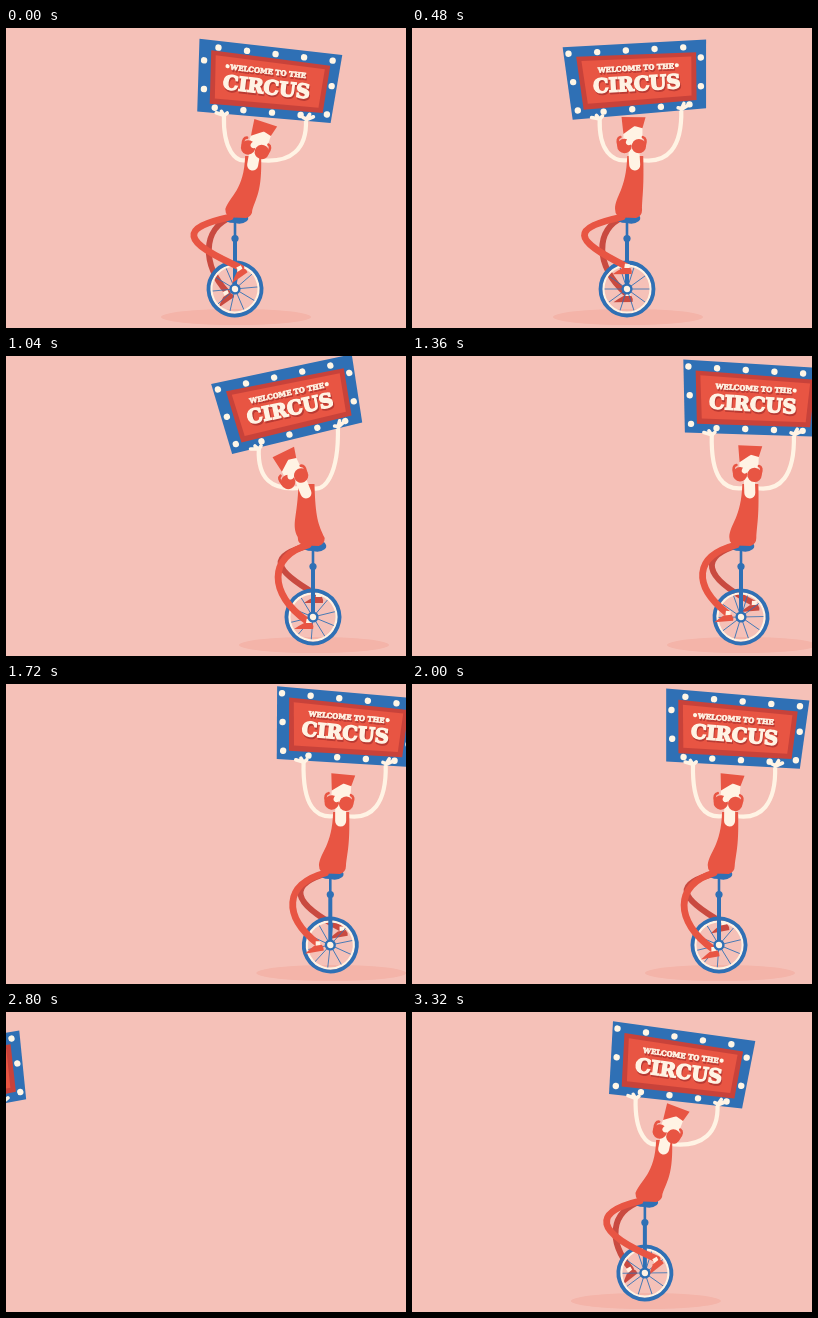
Recreate the animation shown at these times as an HTML page. Size 400 by 300 pixels, loop 3.36 s.

```html
<!DOCTYPE html>
<html lang="en">
<head>
<meta charset="utf-8">
<title>Unicyclist</title>
<style>
  html, body { margin: 0; width: 100%; height: 100%; overflow: hidden; background: #f5c1b8; }
  svg { display: block; width: 100vw; height: 100vh; }
  text { font-family: "DejaVu Serif", "Noto Serif", serif; font-weight: 700; text-anchor: middle; }
  .line { fill: none; stroke-linecap: round; stroke-linejoin: round; }
</style>
</head>
<body>
<svg viewBox="0 0 400 300">
  <defs>
    <g id="lettering">
      <text y="-8.500" font-size="7" stroke-width=".7">WELCOME TO THE</text>
      <text y="11.500" font-size="19.500" stroke-width="1.5">CIRCUS</text>
    </g>
    <g id="shoe">
      <path d="M1-7L0-1" stroke="#fff3e4" stroke-width="5" fill="none"/>
      <path d="M-14 3Q-8-1-4-3L4-3Q6 0 5 3Z"/>
    </g>
  </defs>
  <rect width="400" height="300" fill="#f5c1b8"/>
  <g id="rider">
    <ellipse cx="1" cy="289" rx="75" ry="8" fill="#f4b4a9"/>
    <path id="backLeg" class="line" stroke="#c94a40" stroke-width="6"/>
    <use id="backShoe" href="#shoe" fill="#c94a40"/>
    <g id="wheel" class="line">
      <g id="spokes" stroke="#2f70b5" stroke-width=".8"></g>
      <circle r="23.6" stroke="#fff3e4" stroke-width="2.2"/>
      <circle r="26.5" stroke="#2f70b5" stroke-width="3.8"/>
    </g>
    <g class="line" stroke="#2f70b5">
      <path d="M0 258V212" stroke-width="4"/>
      <path d="M0 212V192" stroke-width="2.6"/>
    </g>
    <circle cy="210.5" r="3.6" fill="#2f70b5"/>
    <path d="M-12 189Q0 191 11 186Q15 190 12 193Q7 197 0 195Q-11 195-12 189Z" fill="#2f70b5"/>
    <path id="frontLeg" class="line" stroke="#e85543" stroke-width="6.800"/>
    <use id="frontShoe" href="#shoe" fill="#e85543"/>
    <circle cy="261" r="4.4" fill="#fff3e4" stroke="#2f70b5" stroke-width="2.400"/>
    <path id="arms" class="line" stroke="#fff3e4" stroke-width="4.2"/>
    <path id="torso" fill="#e85543"/>
    <path id="neck" class="line" stroke="#fff3e4" stroke-width="11"/>
    <g id="head">
      <path d="M-8-6L11-12L11 8L-8 10Z" fill="#fff3e4"/>
      <path d="M-10-19L14-19L11-8L3-10L-8-2Z" fill="#e85543"/>
      <g fill="#e85543">
        <circle cx="-7" cy="10" r="7.2"/>
        <circle cx="7.500" cy="10" r="7.2"/>
      </g>
      <path class="line" d="M-13 9Q-15 2-11 1M13.500 9Q15.500 2 11.500 1" stroke="#e85543" stroke-width="2.600"/>
      <path d="M-2-5C-2 2-7 5-5 8Q-2 11 1 7L4-3Z" fill="#fff3e4"/>
    </g>
    <g id="sign">
      <path d="M-72-35.700L71.700-35.600L67.800 33.200L-66 37Z" fill="#2f70b5"/>
      <path d="M-59-25.500L61-23.500L58.800 24.300L-54.500 27.700Z" fill="#c8423a"/>
      <path d="M-54-21L56-19.500L54 19.500L-50 22Z" fill="#e85543"/>
      <use href="#lettering" x="1" y="1.800" fill="#b93a33" stroke="#b93a33"/>
      <use href="#lettering" fill="#fff3e4" stroke="#fff3e4"/>
      <path id="lampTrack" d="M-66.500-29L66-29L63 28L-60 31.500Z" fill="none"/>
      <g id="lamps" fill="#fff6e6"></g>
      <g class="line" stroke="#fff3e4" stroke-width="3.6">
        <path d="M-39 38L-42 34M-40 37.500L-47 36M-39 38L-36 35"/>
        <path d="M43 33L46 27M43 33L50 29M43 32L40 31"/>
      </g>
    </g>
  </g>
</svg>
<script>
const LOOP = 3360, STEP = 40, TRAVEL = -640, WHEEL_Y = 261, LAMPS = 26;
const el = id => document.getElementById(id);
const set = (id, name, value) => el(id).setAttribute(name, value);
const radians = degrees => degrees * Math.PI / 180;

// Key poses: time, wheel x, sign offset from the wheel, sign y, sign angle
const keys = [
  [0, 229, 32, 54.3, 6.5],
  [480, 215, 9.5, 51, -3.2],
  [680, 229, -11, 50, -9.5],
  [1040, 307, -24, 48, -12],
  [1360, 329, 12, 43.5, 3.5],
  [2000, 307, 16, 46, 4.7],
  [2240, 246, 30, 52, 7.5],
  [2800, -100, 48, 65, -9],
  [3140, -358, 47, 55, 13]
];

function keyAt(i) {
  const n = keys.length, turn = Math.floor(i / n);
  const [t, x, ...rest] = keys[i - turn * n];
  return [t + turn * LOOP, x + turn * TRAVEL, ...rest];
}

// Cubic Hermite through the keys, continuous across the loop
function poseAt(t) {
  let i = keys.length - 1;
  while (keys[i][0] > t) i--;
  const [a, b, c, d] = [i - 1, i, i + 1, i + 2].map(keyAt);
  const h = c[0] - b[0], u = (t - b[0]) / h, u2 = u * u, u3 = u2 * u;
  return [1, 2, 3, 4].map(k => {
    const m0 = (c[k] - a[k]) / (c[0] - a[0]) * h;
    const m1 = (d[k] - b[k]) / (d[0] - b[0]) * h;
    return (2 * u3 - 3 * u2 + 1) * b[k] + (u3 - 2 * u2 + u) * m0 +
           (3 * u2 - 2 * u3) * c[k] + (u3 - u2) * m1;
  });
}

const circle = (x, y, r) => `<circle cx="${x}" cy="${y}" r="${r}"/>`;

// Evenly spaced lamps; every other one is lit, with a dot beside the title
function lampSet(odd) {
  const track = el('lampTrack'), gap = track.getTotalLength() / LAMPS;
  let dots = circle(odd ? -41 : 41, -11.5, 2.1);
  for (let i = odd; i < LAMPS; i += 2) {
    const p = track.getPointAtLength(i * gap);
    dots += circle(p.x, p.y, 3.2);
  }
  return dots;
}
const lampSets = [lampSet(1), lampSet(0)];

for (let i = 0; i < 10; i++) {
  el('spokes').innerHTML += `<path d="M5 0H23" transform="rotate(${i * 36})"/>`;
}

function drawLeg(name, angle, hipX, bulge, tilt) {
  const fx = 14 * Math.cos(angle), fy = WHEEL_Y - 4 + 14 * Math.sin(angle);
  const knee = bulge - (fy - 242) * .4;
  set(name + 'Leg', 'd', `M${hipX} 189C${-knee} 200 ${-knee} ${fy - 32} ${fx - 1} ${fy - 5}`);
  set(name + 'Shoe', 'transform', `translate(${fx} ${fy}) rotate(${tilt})`);
}

function drawTorso(sx, lean) {
  const left = -12 + .1 * lean, right = left + 27, bow = .2 * lean;
  set('torso', 'd', `M${sx - 8} 128C${sx - 9} 162 ${left + bow} 168 ${left} 181Q${left} 189 ${left + 8} 189.5
    L${right - 6} 190Q${right} 188 ${right} 182C${right + bow} 168 ${sx + 9} 162 ${sx + 8} 128Z`);
}

function draw(t) {
  const [path, dx, cy, rot] = poseAt(t);
  const x = t > 2820 ? path - TRAVEL : path;
  const lean = dx - 9, turn = (path - 215) * 2.2, crank = radians(turn - 92);
  set('rider', 'transform', `translate(${x} 0)`);
  set('wheel', 'transform', `translate(0 ${WHEEL_Y}) rotate(${turn})`);

  const tilt = Math.min(0, -1.5 * lean);
  drawLeg('back', crank + Math.PI, -3, 44, tilt);
  drawLeg('front', crank, -5, 56, tilt);

  const sx = 8 + .44 * lean;
  drawTorso(sx, lean);

  const headX = 4 + .82 * lean, headY = 108 + .18 * Math.abs(lean);
  set('head', 'transform', `translate(${headX} ${headY}) rotate(${.8 * lean})`);
  set('neck', 'd', `M${headX * .3 + sx * .7} 126L${sx - .5} 137`);

  const cos = Math.cos(radians(rot)), sin = Math.sin(radians(rot));
  const hand = (px, py) => [dx + px * cos - py * sin, cy + px * sin + py * cos];
  const [lx, ly] = hand(-39, 38), [rx, ry] = hand(43, 33);
  set('arms', 'd', `M${sx - 6} 132C${lx + 12} 135 ${lx - 1} 122 ${lx} ${ly}
    M${sx + 6} 132C${rx - 14} 136 ${rx + 1} 120 ${rx} ${ry}`);
  set('sign', 'transform', `translate(${dx} ${cy}) rotate(${rot})`);

  el('lamps').innerHTML = lampSets[Math.floor((t + 120) / 200) % 2];
}

let start;
function tick(now) {
  start ??= now;
  draw(Math.floor((now - start) % LOOP / STEP) * STEP);
  requestAnimationFrame(tick);
}
draw(0);
requestAnimationFrame(tick);
</script>
</body>
</html>
```
